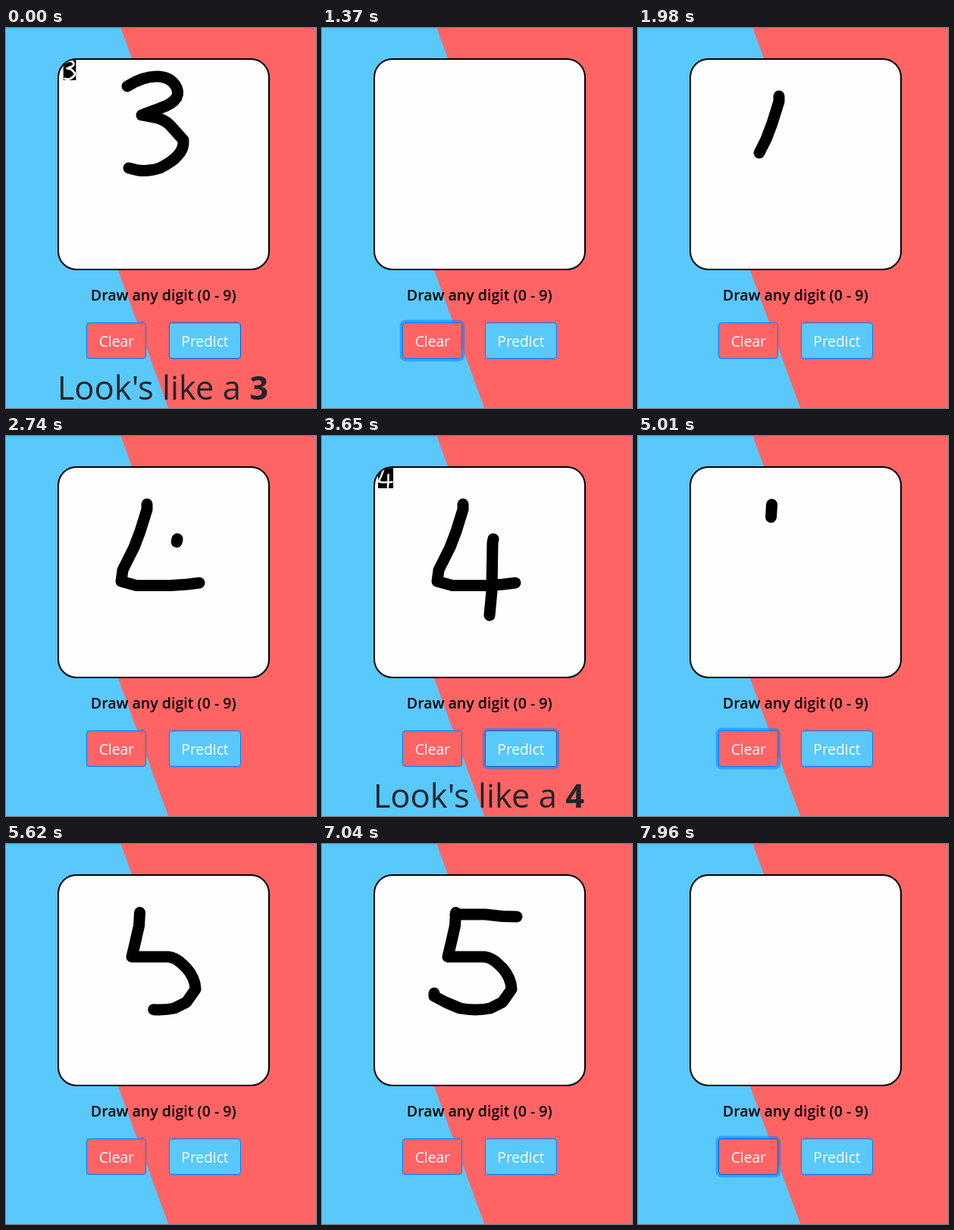
Animation, 409 px wide and 502 px high, one loop 8 s. Source, as an HTML page:

```html
<!DOCTYPE html>
<html lang="en">
<head>
<meta charset="utf-8">
<title>Digit recognizer</title>
<style>
  html, body { margin: 0; width: 100%; height: 100%; overflow: hidden; background: #ff6464; }
  svg { display: block; width: 100%; height: 100%; font-family: "Open Sans", "Noto Sans", sans-serif; }

  .board { fill: #fefefe; stroke: #000; stroke-width: 2; }
  .ink { fill: none; stroke: #000; stroke-width: 15; stroke-linecap: round; stroke-linejoin: round; }
  .thumb { stroke: #fff; }
  .hint { font-size: 19.55px; font-weight: 600; text-anchor: middle; }
  .label { font-size: 19.2px; font-weight: 500; fill: #fff; text-anchor: middle; }
  .result { font-size: 43.5px; fill: #212529; }
  .result tspan { font-weight: 700; }
  .button { stroke: #007bff; }
  .ring { fill: none; stroke: #007bff; stroke-opacity: .5; stroke-width: 3.2; opacity: 0; }

  .anim { animation: 8s linear infinite; }
  .show { animation: 8s step-end infinite; }

  /* visibility of each digit and its prediction */
  .three { animation-name: three; }
  .four { animation-name: four; }
  .four-found { animation-name: four-found; }
  .five { animation-name: five; }
  .five-found { animation-name: five-found; }
  @keyframes three { 0% { opacity: 1 } 12.5%, 100% { opacity: 0 } }
  @keyframes four { 0% { opacity: 0 } 21.875% { opacity: 1 } 56.25%, 100% { opacity: 0 } }
  @keyframes four-found { 0% { opacity: 0 } 44.75% { opacity: 1 } 56.25%, 100% { opacity: 0 } }
  @keyframes five { 0% { opacity: 0 } 62.625% { opacity: 1 } 98.5%, 100% { opacity: 0 } }
  @keyframes five-found { 0% { opacity: 0 } 89.375% { opacity: 1 } 98.5%, 100% { opacity: 0 } }

  /* pen strokes */
  .pen { stroke-dasharray: 1 2; }
  .four-hook { animation-name: four-hook; }
  .four-stem { animation-name: four-stem; }
  .five-body { animation-name: five-body; }
  .five-bar { animation-name: five-bar; }
  @keyframes four-hook {
    0%, 21.875% { stroke-dashoffset: .98; animation-timing-function: steps(11) }
    28.25%, 100% { stroke-dashoffset: 0 }
  }
  @keyframes four-stem {
    0%, 34.24% { stroke-dashoffset: .96; opacity: 0 }
    34.25% { stroke-dashoffset: .96; opacity: 1; animation-timing-function: steps(7) }
    38.375%, 100% { stroke-dashoffset: 0; opacity: 1 }
  }
  @keyframes five-body {
    0%, 62.625% { stroke-dashoffset: .942; animation-timing-function: steps(15) }
    71.5%, 100% { stroke-dashoffset: 0 }
  }
  @keyframes five-bar {
    0%, 77.74% { stroke-dashoffset: .85; opacity: 0 }
    77.75% { stroke-dashoffset: .85; opacity: 1; animation-timing-function: steps(4) }
    80%, 100% { stroke-dashoffset: 0; opacity: 1 }
  }

  /* button focus and hover */
  .clear-ring { animation-name: clear-ring; }
  .predict-ring { animation-name: predict-ring; }
  .clear { animation-name: clear; }
  .predict { animation-name: predict; }
  @keyframes clear-ring {
    0%, 11.375% { opacity: 0 }
    13.25%, 21.875% { opacity: 1 }
    23.75%, 54.75% { opacity: 0 }
    56.625%, 62.625% { opacity: 1 }
    64.5%, 97.25% { opacity: 0 }
    99.125%, 100% { opacity: 1 }
  }
  @keyframes predict-ring {
    0%, 43.75% { opacity: 0 }
    45.625%, 54.75% { opacity: 1 }
    56.625%, 88.625% { opacity: 0 }
    90.5%, 97.25% { opacity: 1 }
    99.125%, 100% { opacity: 0 }
  }
  @keyframes clear {
    0%, 6.25% { stroke: #007bff }
    7.25%, 15.5% { stroke: #0062cc }
    17.125%, 51% { stroke: #007bff }
    52.875%, 56.25% { stroke: #0062cc }
    58%, 92.9% { stroke: #007bff }
    94.375%, 100% { stroke: #0062cc }
  }
  @keyframes predict {
    0%, .5% { stroke: #0062cc }
    2.125%, 43.5% { stroke: #007bff }
    45.375%, 49.125% { stroke: #0062cc }
    51%, 88% { stroke: #007bff }
    89.875%, 92.75% { stroke: #0062cc }
    94.375%, 100% { stroke: #007bff }
  }
</style>
</head>
<body>
<svg viewBox="0 0 409 502">
  <defs>
    <clipPath id="inside"><rect x="70" y="42" width="276" height="276" rx="23"/></clipPath>
    <path id="three" d="M160 77Q180 64 199 64Q215 64 223 75Q229 84 225 92Q219 101 203 106L179 115L200 119Q210 122 216 128L234 148Q235 160 226 169Q219 177 203 185Q188 190 174 188L162 185"/>
    <path id="hook" pathLength="1" d="M186 90L186 97L177 126L169 147L154 177L152 192L172 197.500L217 197.500L239 196L255 194"/>
    <path id="stem" pathLength="1" d="M226 136L225 141L224 205L221 237"/>
    <path id="body" pathLength="1" d="M176.500 90.500L175.500 108L171 128L166 149L214 149Q224 150 233 159Q245 169 249 184L250 192L238 209L222 217Q203 221 182 217L163 209L148 201L148 197"/>
    <path id="bar" pathLength="1" d="M176 93L215 93L238 95.500L257 96"/>
  </defs>

  <rect width="409" height="502" fill="#ff6464"/>
  <path fill="#59c8fb" d="M0 0H151.500L217 180H0ZM0 180H97L214.200 502H0Z"/>

  <rect class="board" x="69" y="41" width="278" height="278" rx="24"/>

  <g class="ink" clip-path="url(#inside)">
    <g class="show three">
      <use href="#three"/>
      <rect x="75.700" y="42" width="16.600" height="27" fill="#000" stroke="none"/>
      <use class="thumb" href="#three" transform="translate(47.500 31.200) scale(.185 .193)"/>
    </g>
    <g class="show four">
      <use class="pen anim four-hook" href="#hook"/>
      <use class="pen anim four-stem" href="#stem"/>
      <g class="show four-found">
        <rect x="74" y="42" width="20" height="27" fill="#000" stroke="none"/>
        <g class="thumb" transform="translate(50 28.300) scale(.1667)">
          <use href="#hook"/><use href="#stem"/>
        </g>
      </g>
    </g>
    <g class="show five">
      <use class="pen anim five-body" href="#body"/>
      <use class="pen anim five-bar" href="#bar"/>
      <g class="show five-found">
        <rect x="72.200" y="42" width="23.600" height="27" fill="#000" stroke="none"/>
        <g class="thumb" transform="translate(45.700 26.300) scale(.189)">
          <use href="#body"/><use href="#bar"/>
        </g>
      </g>
    </g>
  </g>

  <text class="hint" x="207.700" y="360">Draw any digit (0 - 9)</text>

  <rect class="ring anim clear-ring" x="104.400" y="387.400" width="82.200" height="51.200" rx="5.500"/>
  <rect class="button anim clear" x="106.500" y="389.500" width="78" height="47" rx="3.500" fill="#ff6464"/>
  <text class="label" x="145.800" y="421">Clear</text>

  <rect class="ring anim predict-ring" x="213.400" y="387.400" width="98.200" height="51.200" rx="5.500"/>
  <rect class="button anim predict" x="215.500" y="389.500" width="94" height="47" rx="3.500" fill="#59c8fb"/>
  <text class="label" x="262.500" y="421">Predict</text>

  <g class="result">
    <text class="show three" x="67.700" y="490.500">Look's like a <tspan>3</tspan></text>
    <text class="show four-found" x="67.700" y="490.500">Look's like a <tspan>4</tspan></text>
    <text class="show five-found" x="67.700" y="490.500">Look's like a <tspan>5</tspan></text>
  </g>
</svg>
</body>
</html>
```
